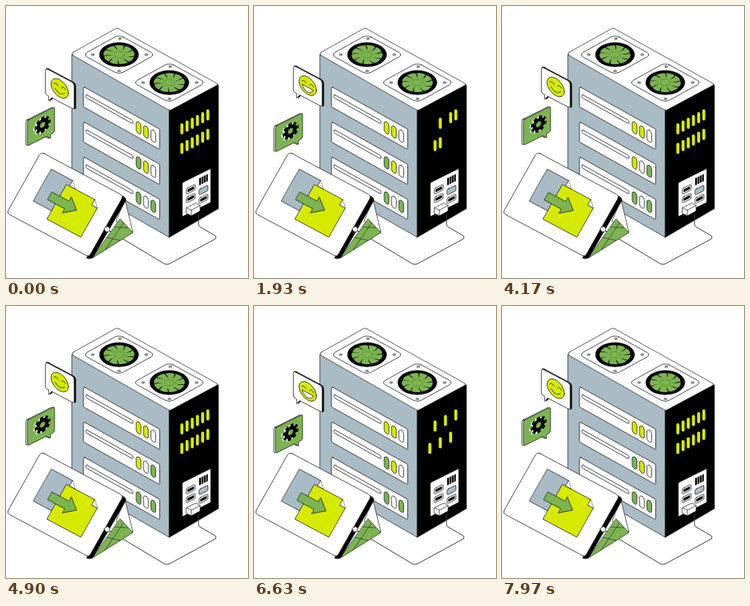
Recreate the animation shown at these times as an HTML page. Size 303 px wide and 341 px high, loop 8.01 s.

```html
<!DOCTYPE html>
<html lang="en">
<head>
<meta charset="utf-8">
<title>Server transfer</title>
<style>
html, body { margin: 0; width: 100%; height: 100%; overflow: hidden; background: #fff; }
svg { display: block; width: 100vw; height: 100vh; }
</style>
</head>
<body>
<svg id="stage" viewBox="0 0 303 341" stroke="#222" stroke-width=".7" stroke-linejoin="round" stroke-linecap="round"></svg>
<script>
const LIME = '#d6ea00', GREEN = '#7cb451', GRAY = '#a9bcc5', WHITE = '#fff', BLACK = '#000';
const LOOP = 8010, CYCLE = LOOP / 2, BEAT = LOOP / 8;
const stage = document.getElementById('stage');
const $ = id => document.getElementById(id);
const repeat = (n, fn) => Array.from({ length: n }, (_, i) => fn(i)).join('');
const path = (d, fill = 'none', extra = '') => `<path d="${d}" fill="${fill}" ${extra}/>`;
const group = (transform, content, id = '') => `<g transform="${transform}" id="${id}">${content}</g>`;
const box = (x, y, w, h, r, fill, extra = '') =>
  `<rect x="${x}" y="${y}" width="${w}" height="${h}" rx="${r}" fill="${fill}" ${extra}/>`;
const disc = (x, y, r, fill, extra = '') => `<circle cx="${x}" cy="${y}" r="${r}" fill="${fill}" ${extra}/>`;

function fan(i, x, y) {
  const blade = k => group(`rotate(${k * 40})`, path('M-3 -6Q-1 -13 -6 -18Q0 -21 6 -18Q6 -11 3 -6Z', GREEN, 'stroke="none"'));
  const bolts = [[1, -20], [-33, 0], [34, 0], [0, 20.5]]
    .map(([dx, dy]) => `<ellipse cx="${dx}" cy="${dy}" rx="1.8" ry="1.2" fill="${GRAY}" stroke-width=".5"/>`).join('');
  return group(`translate(${x} ${y})`,
    group('matrix(.87 .48 -.87 .48 0 0)', box(-26, -26, 52, 52, 6, WHITE)) + bolts +
    group('scale(1 .62)', disc(0, 0, 24.5, BLACK) +
      group('', repeat(9, blade), 'fan' + i) +
      disc(0, 0, 9, GREEN, 'stroke="none"') + disc(0, 0, 6.5, GREEN, 'stroke="#5b7a22"')));
}

function drive(i) {
  const led = k => box(66 + k * 9.2, 5.8, 6, 14.5, 3, WHITE, `id="led${i}${k}"`);
  return group(`matrix(1 .56 0 1 97 ${101 + i * 44})`,
    box(0, 0, 95.5, 25.5, 1.5, WHITE) + box(3, 8, 59, 4.2, 1.5, WHITE) + repeat(3, led));
}

function vents() {
  return repeat(12, i => {
    const col = i % 6, row = Math.floor(i / 6);
    return box(218.3 + col * 6.5, 147 + row * 24.5 - col * 3.5, 3.8, 14, 1.9, LIME, `stroke="none" id="vent${i}"`);
  });
}

function ports() {
  const socket = (x, y) => box(x, y, 11, 7, 1.5, WHITE) + box(x + 1.5, y + 1.8, 8, 3.4, .5, BLACK, 'stroke="none"');
  return group('matrix(1 -.5 0 1 220.8 221.5)',
    box(0, 0, 35.5, 42.5, 1, WHITE) +
    socket(5, 10) + socket(5, 21) + socket(21, 30) +
    box(21, 19, 11, 7, 1.5, GRAY) +
    repeat(4, k => box(21 + k * 2.9, 5, 2.2, 9, .5, BLACK, 'stroke="none"')));
}

function server() {
  return path('M82.5 61V220L204.5 290V130Z', GRAY) +
    path('M204.5 131L264 98Q266 98 266 101V254L204.5 290Z', BLACK) +
    path('M84 58L137 28.5Q139 27.5 141 28.5L264 97Q266 98.5 263 100L207 130Q205 131 203 130L84 62Q82 60 84 58Z', WHITE) +
    fan(0, 141.5, 61) + fan(1, 204.5, 96) + repeat(3, drive) + vents() + ports();
}

function cable() {
  return path('M128 281L198 323Q201 325 205 323L262 292Q264 290 262 288L243 277Q241 276 241 273V261', 'none', 'stroke="#444" stroke-width="1"') +
    path('M226 253L238 247L243 250V257L232 263L226 260Z', WHITE) + path('M226 253L232 256L243 250M232 256V263');
}

function tablet() {
  const sheet = (x, y, w, h, fill) => path(`M${x} ${y}h${w - 8}l8 8v${h - 8}h${-w}z`, fill) +
    path(`M${x + w - 8} ${y}v8h8`, WHITE);
  return path('M149 243L159 284L138 270Z', WHITE) +
    path('M143 267L159 284L108 316Z', GREEN) + path('M126 290L143 294M136 277L152 278M147 272L124 306', 'none', 'stroke-width=".6"') +
    path('M142 237Q151 239 150 244L109 315Q106 318 101 316Z', BLACK) +
    group('matrix(.88 .47 -.49 .87 44 183)',
      box(0, 0, 117, 88, 4, WHITE) + sheet(22, 13, 38, 46, GRAY) + sheet(48, 21, 48, 50, LIME) +
      group('', path('M38 38H62V32L76 43.5L62 55V49H38Z', GREEN), 'arrow')) +
    path('M123 279L127 276L130 279L129 283L125 283Z', WHITE);
}

function smiley() {
  const outline = 'M-17 -16H15Q18 -16 18 -13V15Q18 17 15 17H-10L-14 23V17H-16Q-18 17 -18 14V-13Q-18 -16 -15 -16Z';
  return group('', group('matrix(1 .53 0 1 0 0)',
    group('translate(2 -1)', path(outline, BLACK)) + path(outline, WHITE) + disc(0, 0, 11, LIME) +
    path('M-7.5 -2Q-5 -6 -2 -2M2 -2Q5 -6 7.5 -2') +
    path('M-6 3Q0 10 6 3', 'none', 'id="smile"') +
    path('M-7 2H7Q5 8 0 8Q-5 8 -7 2Z', WHITE, 'id="laugh"')), 'smiley');
}

function gear() {
  const outline = 'M-16 -15H15Q17 -15 17 -13V14Q17 17 14 17H12V22L7 17H-15Q-17 17 -17 14V-12Q-17 -15 -15 -15Z';
  const cog = (id, color) => group('', disc(0, 0, 7.5, color, 'stroke="none"') +
    repeat(8, k => box(-2, -10, 4, 5, .6, color, `stroke="none" transform="rotate(${k * 45})"`)), id);
  return group('', group('matrix(1 -.5 0 1 0 0)',
    group('translate(-2 -1)', path(outline, WHITE)) + path(outline, GREEN) +
    group('translate(.5 0)', cog('cogEdge', WHITE)) +
    group('translate(2 0)', cog('cog', BLACK) + disc(0, 0, 3.5, GREEN))), 'gear');
}

stage.innerHTML = server() + cable() + tablet() + smiley() + gear();

const wave = (p, peak = 0) => Math.cos(2 * Math.PI * (p - peak));
const within = (p, from, to) => p >= from && p < to;

function litVents(p) {
  if (within(p, .25, .35)) return '101010010101';
  if (within(p, .35, .45)) return '010110010101';
  if (within(p, .45, .57)) return '001011011000';
  if (within(p, .57, .7)) return '010101101010';
  return '111111111111';
}

function ledColors(p) {
  const full = within(p, .36, .46) || within(p, .7, .9);
  const swapped = p > .97 || p < .02 || within(p, .46, .69);
  return [
    [LIME, LIME, full ? LIME : WHITE],
    swapped ? [GREEN, LIME, WHITE] : [LIME, WHITE, GREEN],
    [GREEN, WHITE, within(p, .36, .44) ? WHITE : GREEN]
  ];
}

function draw(time) {
  const t = time % LOOP, p = t % CYCLE / CYCLE;
  const move = (id, value) => $(id).setAttribute('transform', value);
  move('smiley', `translate(67.3 ${102 + 7 * wave(p, .78)})`);
  move('gear', `translate(43.8 ${154 + 5.5 * wave(p, .62)})`);
  for (const id of ['cog', 'cogEdge']) move(id, `rotate(${p * 360})`);
  move('arrow', `translate(${1.3 * wave(t / BEAT, .45)} 0)`);
  for (const i of [0, 1]) move('fan' + i, `rotate(${t / BEAT * 360})`);

  const laughing = within(p, .45, .85);
  $('laugh').style.display = laughing ? '' : 'none';
  $('smile').style.display = laughing ? 'none' : '';
  [...litVents(p)].forEach((on, i) => $('vent' + i).style.opacity = on);
  ledColors(p).forEach((row, i) => row.forEach((color, k) => $(`led${i}${k}`).setAttribute('fill', color)));
}

const start = performance.now();
function tick() {
  draw(performance.now() - start);
  requestAnimationFrame(tick);
}
tick();
</script>
</body>
</html>
```
